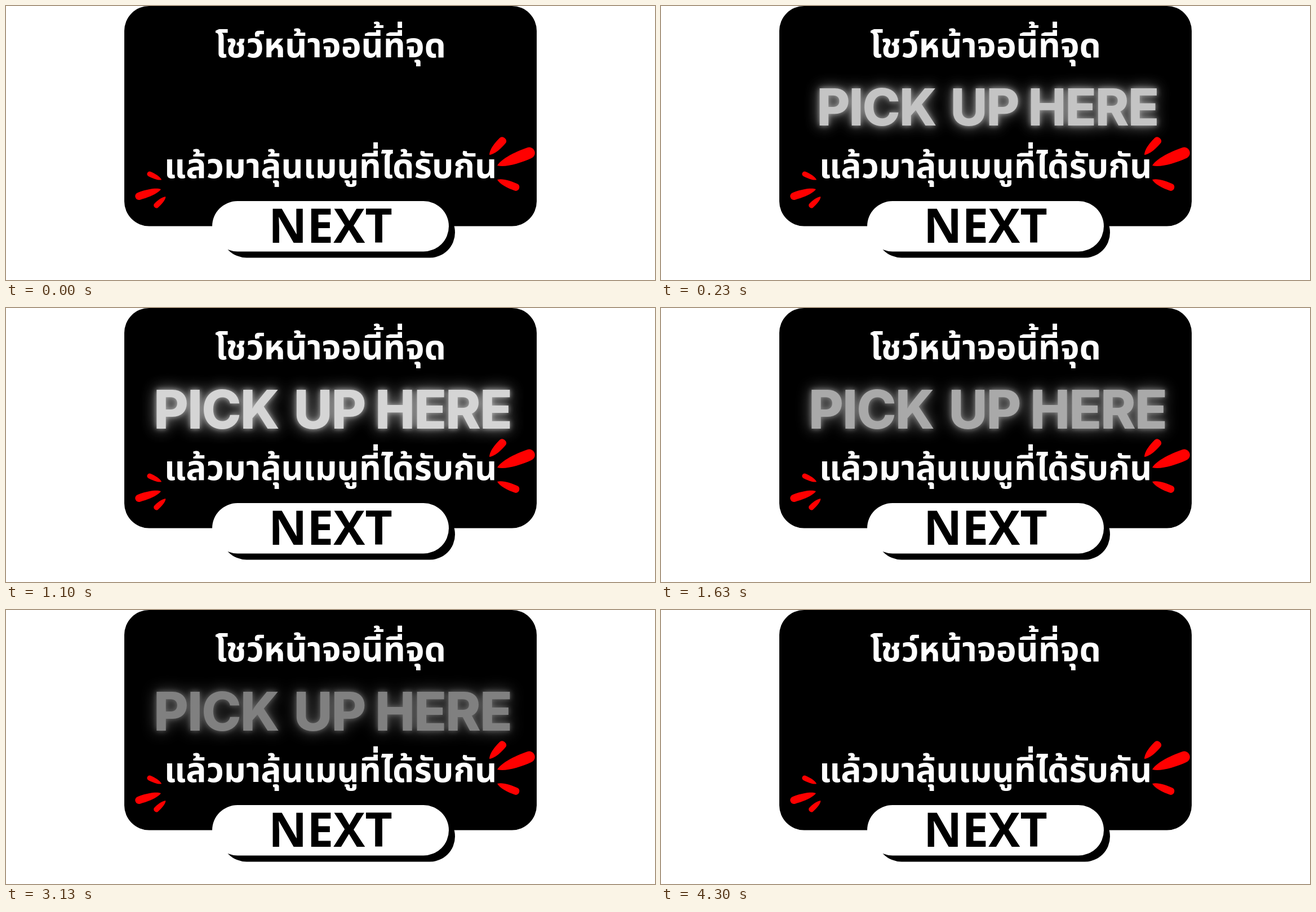
Write an HTML page that moves like this. It is 1152 px wide and 486 px high and loops after 5010 ms.

```html
<!DOCTYPE html>
<html lang="th">
<meta charset="utf-8">
<title>Pick up here</title>
<style>
  html, body { margin: 0; height: 100%; overflow: hidden; background: #fff; }
  svg { display: block; width: 100%; height: 100%; }
  text { font: 700 60.6px "Noto Sans Thai", "Noto Sans", sans-serif; fill: #fff; text-anchor: middle; }
  .next { font: 800 84px "Noto Sans", "Open Sans", sans-serif; fill: #000; }
  #sign { filter: drop-shadow(0 0 5px #fffb) drop-shadow(0 0 13px #fff9); }
  #sign text { font: 800 95px Inter, sans-serif; letter-spacing: -2px; }
</style>
<svg viewBox="0 0 1152 486">
  <defs>
    <path id="drop" d="M0 0C12-9 40-11 61-10A10 10 0 0 1 61 10C40 11 12 9 0 0Z"/>
    <g id="burst" fill="#f00">
      <use href="#drop" transform="rotate(-21.5)"/>
      <use href="#drop" transform="translate(-14 -19) rotate(-47) scale(.57 .7)"/>
      <use href="#drop" transform="translate(0 25) rotate(22) scale(.59 .65)"/>
    </g>
  </defs>
  <rect x="210" width="732" height="390.5" rx="44"/>
  <text x="576" y="91">โชว์หน้าจอนี้ที่จุด</text>
  <text x="576" y="305">แล้วมาลุ้นเมนูที่ได้รับกัน</text>
  <use href="#burst" transform="translate(872 283)"/>
  <use href="#burst" transform="translate(275 325) rotate(184) scale(.67)"/>
  <rect x="382" y="357" width="415" height="89.5" rx="45"/>
  <rect x="366" y="346" width="420" height="89.5" rx="45" fill="#fff"/>
  <text class="next" x="576" y="420">NEXT</text>
  <g id="sign">
    <text x="373" y="213.5">PICK</text>
    <text x="574" y="213.5">UP</text>
    <text x="776" y="213.5">HERE</text>
  </g>
</svg>
<script>
  const LOOP = 5010, CYCLE = 1300, LIT = 1100, END = 4300;
  const sign = document.getElementById('sign');
  const clamp = v => Math.min(1, Math.max(0, v));

  function draw(now) {
    const t = now % LOOP;
    // each cycle swells and dims, then rests at half brightness
    const lit = clamp(((t + 570) % CYCLE) / LIT);
    const glow = .5 + .41 * Math.abs(Math.sin(Math.PI * lit)) ** 1.5;
    const fade = clamp((t - 10) / 200) * clamp((END - t) / 180);
    const grow = 1 - .154 * (1 - clamp(t / 693)) ** 3 + .058 * clamp((t - 3900) / 400) ** 3;
    sign.setAttribute('opacity', t < 30 ? 0 : glow * fade);
    sign.setAttribute('transform', `translate(576 179) scale(${grow}) translate(-576 -179)`);
    requestAnimationFrame(draw);
  }
  requestAnimationFrame(draw);
</script>
</html>
```
